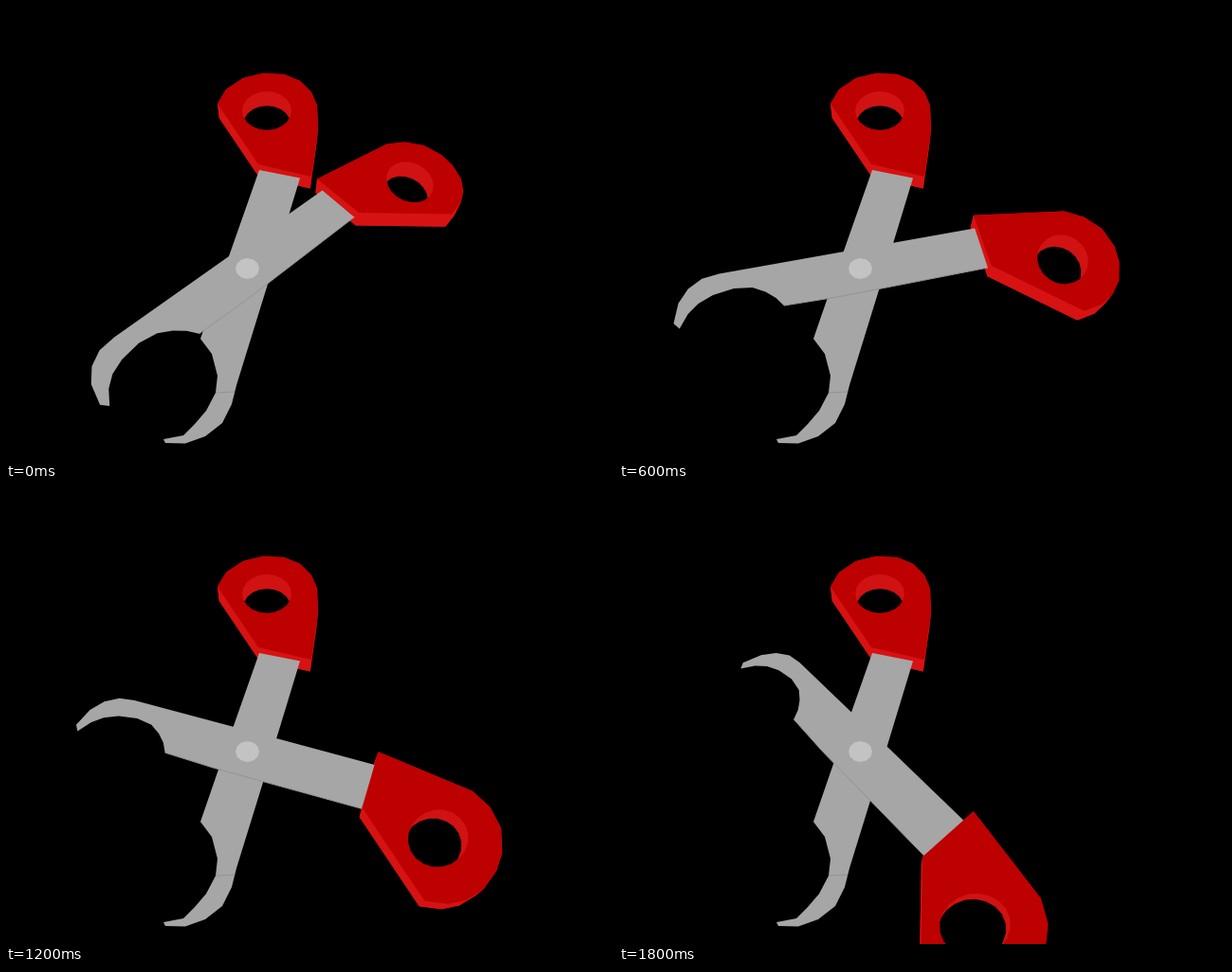
An HTML page with a canvas that plays this animation: 640 by 480 pixels, repeating every 2 s.

```html
<!DOCTYPE html>
<html>
<head>
<meta charset="utf-8">
<style>
  html, body { margin: 0; width: 100%; height: 100%; overflow: hidden; background: #000; }
  canvas { display: block; }
</style>
</head>
<body>
<canvas id="stage" width="640" height="480"></canvas>
<script>
const ctx = document.getElementById('stage').getContext('2d');
const STEP_MS = 200, STEPS = 10, TURN = 10 * Math.PI / 180;
const REF_STEP = 5; // pose in which the moving half is described

// Tilted ground plane seen in perspective around the rivet
const PIVOT = [254, 277], SHEAR = 0.075, SQUASH = 1.181, DEPTH = 0.00114;
const VANISH = [280, 600]; // where vertical edges meet

const RED = '#bd0000', SIDE = '#d71212', STEEL = '#a6a6a6';

const sink = (p, h) => p.map((v, i) => v + (VANISH[i] - v) * h);
const lift = (p, h) => p.map((v, i) => (v - VANISH[i] * h) / (1 - h));

function toPlane([px, py]) {
  const x = px - PIVOT[0], y = py - PIVOT[1], w = 1 + DEPTH * y;
  return [(x + SHEAR * y) / w, SQUASH * y / w];
}

function toScreen([X, Y]) {
  const y0 = Y / SQUASH, s = 1 / (1 - DEPTH * y0), y = y0 * s;
  return [PIVOT[0] + X * s - SHEAR * y, PIVOT[1] + y];
}

// Turns a screen point about the rivet; h is its height above the blade
function turn(p, angle, h = 0) {
  const [X, Y] = toPlane(sink(p, h));
  const c = Math.cos(angle), s = Math.sin(angle);
  return lift(toScreen([X * c - Y * s, X * s + Y * c]), h);
}

function ring(cx, cy, rx, ry, n = 20) {
  return Array.from({ length: n }, (_, i) => {
    const a = i / n * 2 * Math.PI;
    return [cx + rx * Math.cos(a), cy + ry * Math.sin(a)];
  });
}

const fixed = {
  thick: 0.03,
  handle: [[266, 167], [223, 103], [232, 88], [250, 76], [271, 71], [293, 72],
    [310, 79], [322, 91], [328, 105], [329, 130], [322, 180]],
  hole: ring(275, 110.5, 26, 20.5),
  blade: [[267, 173], [310, 181.5], [277, 290], [243, 400], [238, 420], [228, 440],
    [210, 454], [189, 461.5], [168, 461], [166, 457], [187, 453], [199, 441],
    [211, 427], [221, 408], [223, 390], [217, 367], [205, 351], [235, 264]],
  line: [[221, 408], [241, 407]]
};

const moving = {
  thick: 0.035,
  handle: [[390, 257], [491, 282], [511, 295], [526, 314], [532, 338], [530, 357],
    [521, 377], [507, 390], [490, 397], [466.5, 398], [386, 316]],
  hole: ring(467, 334, 30, 29),
  blade: [[388, 271], [384, 317], [222, 299], [167, 291], [163, 281], [156, 272],
    [146, 264], [129, 259.5], [108, 260], [92, 264], [79, 271], [66, 282.5],
    [63, 276], [75, 258], [89, 247], [105, 241], [122, 241], [238, 254]],
  line: [[384, 317], [222, 299], [167, 291]]
};

function trace(points) {
  ctx.beginPath();
  points.forEach(p => ctx.lineTo(...p));
}

function fill(points, color) {
  trace(points);
  ctx.closePath();
  ctx.fillStyle = color;
  ctx.fill();
}

function drawHalf({ thick, handle, hole, blade, line }) {
  const base = handle.map(p => sink(p, thick));
  fill(base, SIDE);
  handle.forEach((p, i) => {
    const j = (i + 1) % handle.length;
    fill([p, handle[j], base[j], base[i]], SIDE);
  });

  fill(blade, STEEL);
  trace(line);
  ctx.strokeStyle = '#939393';
  ctx.lineWidth = 1;
  ctx.stroke();

  fill(handle, RED);
  fill(hole, '#d01212');
  ctx.save();
  trace(hole);
  ctx.clip();
  fill(hole.map(p => sink(p, thick)), '#000');
  ctx.restore();
}

function turned(half, angle) {
  const h = half.thick / 2;
  return {
    thick: half.thick,
    handle: half.handle.map(p => turn(p, angle, h)),
    hole: half.hole.map(p => turn(p, angle, h)),
    blade: half.blade.map(p => turn(p, angle)),
    line: half.line.map(p => turn(p, angle))
  };
}

function draw(now) {
  const step = Math.floor(now / STEP_MS) % STEPS;
  ctx.fillStyle = '#000';
  ctx.fillRect(0, 0, 640, 480);
  drawHalf(fixed);
  drawHalf(turned(moving, (step - REF_STEP) * TURN));
  fill(ring(254.5, 277, 12.5, 11, 12), '#c3c3c3');
}

let start;
function tick(now) {
  start ??= now;
  draw(now - start);
  requestAnimationFrame(tick);
}
draw(0);
requestAnimationFrame(tick);
</script>
</body>
</html>
```
